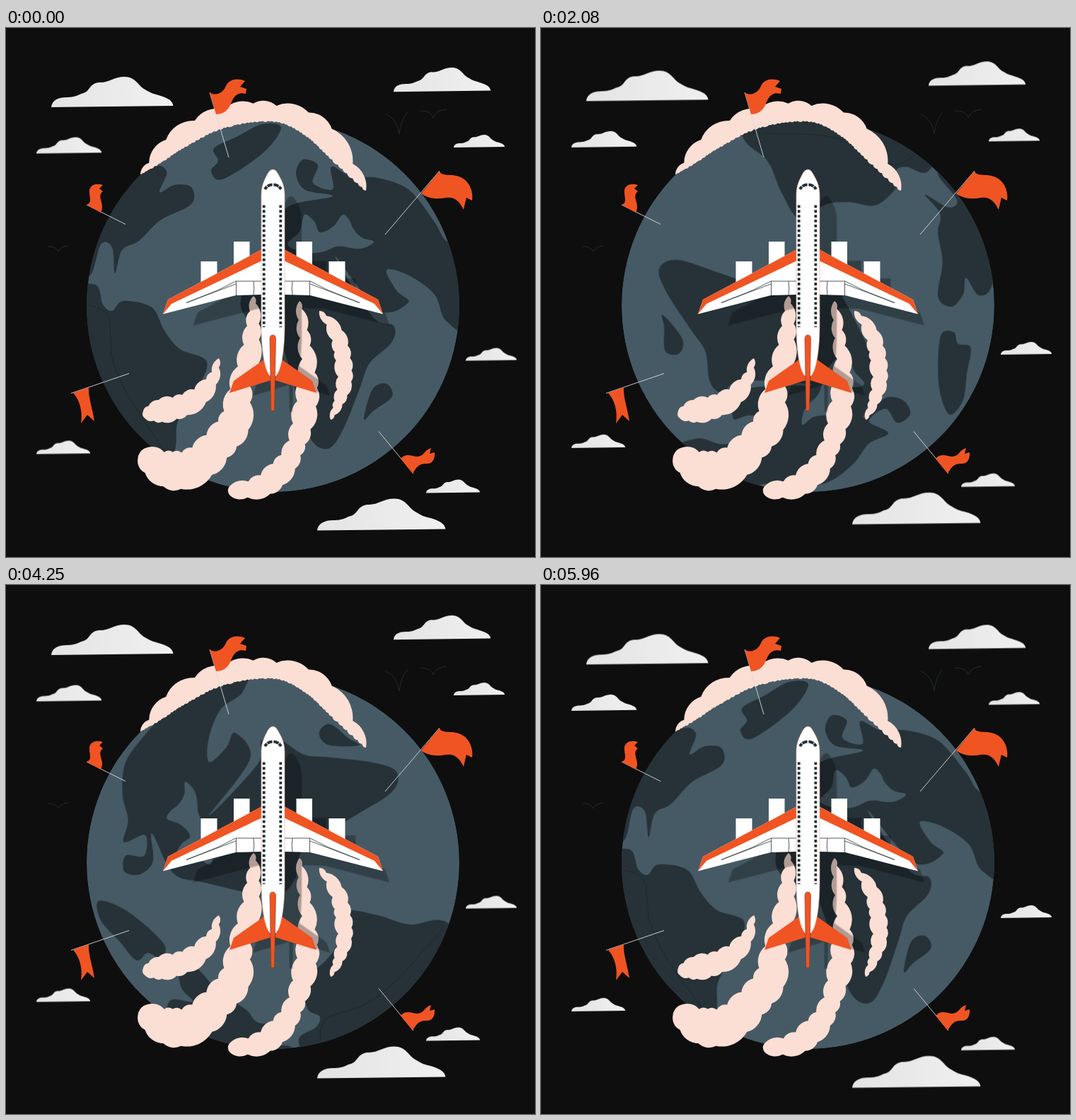
An HTML page for the animation above (6 s loop, 748 by 748 pixels).

```html
<!DOCTYPE html>
<html lang="en">
<head>
<meta charset="utf-8">
<title>Flight around the globe</title>
<style>
  html, body { margin: 0; width: 100%; height: 100%; overflow: hidden; background: #0e0e0e; }
  svg { display: block; width: 100vw; height: 100vh; }
  #world { transform-origin: 377.5px 392.5px; animation: spin 6s steps(144) -5ms infinite; }
  #clouds { animation: bob 3s steps(36) -46.7ms infinite; }
  @keyframes spin { to { transform: rotate(360deg); } }
  @keyframes bob {
    0%, 100% { transform: translateY(.4px); }
    50% { transform: translateY(-15.1px); }
  }
  .land { fill: #263238; }
  .sea { fill: #465a65; }
  .smoke { fill: #fbded4; }
  .orange { fill: #f05423; }
  .line { fill: none; stroke: #263238; }
  .pole { stroke: #dcdcdc; stroke-width: .9; }
</style>
</head>
<body>
<svg viewBox="0 0 748 748" preserveAspectRatio="none">
  <defs>
    <clipPath id="disc"><circle cx="377.5" cy="392.5" r="263.5"/></clipPath>
    <linearGradient id="haze"><stop stop-color="#e4e4e4"/><stop offset="1" stop-color="#f0f0f0"/></linearGradient>
    <path id="cloud" fill="url(#haze)" d="M0 43C1 33 10 29 22 29C36 29 38 25 46 23C55 20 54 10 67 8C82 9 88 0 104 0C120 0 123 13 133 18C143 24 142 23 152 26C166 30 172 34 173 41Z"/>
    <path id="engines" d="M322 302h22.500v36h-22.500zM275.500 330h23v34h-23z"/>
    <path id="wing" d="M362 313L229 384L222 404.500L325 378L362 377Z"/>
    <path id="fuselage" d="M361 236C361 222 366 214 370 206C372 202 375 200 377.500 200C380 200 382.500 202 384.500 206C389 214 394 222 394 236V420C394 460 388 494 377.500 494C367 494 361 460 361 420Z"/>
    <path id="stabilizer" d="M366 468L322 499L316 516L375 498Z"/>
    <path id="fin" d="M373 440Q373 434 377.200 434Q381.500 434 381.500 440L379.500 541H374.800Z"/>
    <g id="side">
      <use href="#engines" fill="#fff"/>
      <use href="#wing" fill="#fff"/>
      <path class="orange" d="M362 313L229 384L222 404.500L234 390L362 329Z"/>
      <path class="line" stroke-width=".8" d="M255 388.500L299 371L325 358H361M255 388.500L325 362M325.500 358V378M350 358Q351.500 368 350 378"/>
      <use href="#stabilizer" class="orange"/>
    </g>
    <g id="sideShape">
      <use href="#engines"/><use href="#wing"/><use href="#stabilizer"/>
    </g>
  </defs>

  <g class="line" stroke-width=".8">
    <path d="M537 122Q553 128 556 150Q558 130 568 119"/>
    <path d="M585 117Q602 117 604 127Q608 116 623 115"/>
    <path d="M59 309Q70 308 74 316Q77 309 88 308"/>
  </g>

  <g clip-path="url(#disc)">
    <circle class="sea" cx="377.500" cy="392.500" r="263.500"/>
    <g id="world"></g>
  </g>
  <g id="trails"></g>

  <g opacity=".3" transform="matrix(.893 0 0 .893 66.300 59.400)">
    <use href="#sideShape"/>
    <use href="#sideShape" transform="matrix(-1 0 0 1 755 0)"/>
    <use href="#fuselage"/><use href="#fin"/>
  </g>

  <g>
    <use href="#side"/>
    <use href="#side" transform="matrix(-1 0 0 1 755 0)"/>
    <use href="#fuselage" fill="#fff" stroke="#f3a68e" stroke-width=".6"/>
    <path class="line" stroke-width="3.800" stroke-dasharray="3.800 3.050" d="M364.700 250.500V423M388.300 250.500V423"/>
    <path class="line" stroke-width="4" stroke-dasharray="4.500 .9 7.500 .9" d="M366 228Q370 221.500 377.200 221.500M389 228Q385 221.500 377.800 221.500"/>
    <use href="#fin" class="orange" stroke="#7a3a2a" stroke-width=".6"/>
  </g>

  <path class="pole" d="M288 91L315 183M114 250L169 277.500M613 202L536 292M92 516.500L174 488.500M527 570.500L576 630"/>
  <g class="orange">
    <path d="M288 91C296 97 307 92 311 82C315 73 326 70 338 75L331 83L340 86L339 93C328 90 322 96 318 107C314 118 305 122 297 122Z"/>
    <path d="M114 250C123 247 117 238 118 229C120 221 128 219 137 222L132 227L137 231C127 239 141 248 134 261Z"/>
    <path d="M613 202C615 211 630 205 643 211C656 217 661 232 659 244L651 240L647 257C642 246 635 238 622 240C606 243 595 240 587 234Z"/>
    <path d="M95 516L117 508C116 522 122 536 125 556L115 547L106 559C109 540 103 525 95 516Z"/>
    <path d="M558 609C566 600 574 606 582 606C592 605 591 597 601 594L599 602L606 600C607 610 602 617 594 616C583 616 580 622 575 630Z"/>
  </g>

  <g id="clouds"></g>
</svg>
<script>
function add(parent, tag, attrs) {
  const el = document.createElementNS("http://www.w3.org/2000/svg", tag);
  for (const k in attrs) el.setAttribute(k, attrs[k]);
  document.getElementById(parent).append(el);
}

const keys = text => text.split(",").map(k => k.trim().split(/\s+/).map(Number));

// Catmull-Rom point at parameter u, in any number of dimensions.
function curve(p, u, closed) {
  const n = p.length, i = Math.floor(u), t = u - i;
  const at = j => closed ? p[(j + n) % n] : p[Math.max(0, Math.min(n - 1, j))];
  const [a, b, c, d] = [at(i - 1), at(i), at(i + 1), at(i + 2)];
  return b.map((v, k) => v + t / 2 * (c[k] - a[k]
    + t * (2 * a[k] - 5 * v + 4 * c[k] - d[k] + t * (3 * (v - c[k]) + d[k] - a[k]))));
}

// Closed coastline; curl pushes each edge's middle in and out by turns.
function coast(cls, text, curl = 0) {
  const p = keys(text).flatMap(([x, y], i, all) => {
    const [x2, y2] = all[(i + 1) % all.length], c = i % 2 ? curl : -curl;
    return curl ? [[x, y], [(x + x2) / 2 + c * (y2 - y), (y + y2) / 2 - c * (x2 - x)]] : [[x, y]];
  });
  const line = Array.from({ length: p.length * 8 }, (_, i) => curve(p, i / 8, true));
  add("world", "path", { class: cls, d: "M" + line.join("L") + "Z" });
}

function random(seed) {
  return () => (seed = seed * 16807 % 2147483647) / 2147483647;
}

// Smoke along a spine of "x y half-width" keys, with round puffs on both sides.
function trail(text, leftPuffs, rightPuffs) {
  const p = keys(text), last = p.length - 1, rnd = random(leftPuffs * 97);
  const edge = (u, sign) => {
    const [x, y, w] = curve(p, u);
    const [ax, ay] = curve(p, Math.max(0, u - .05)), [bx, by] = curve(p, Math.min(last, u + .05));
    const k = sign * w / Math.hypot(bx - ax, by - ay);
    return [x + (by - ay) * k, y - (bx - ax) * k];
  };
  const side = (n, sign) => Array.from({ length: n + 1 }, (_, i) => {
    const jitter = i % n ? (rnd() - .5) * .5 : 0;
    return edge((i + jitter) / n * last, sign);
  });
  const rim = [...side(leftPuffs, 1), ...side(rightPuffs, -1).reverse()];
  const arcs = rim.slice(1).map(([x, y], i) => {
    const r = Math.hypot(x - rim[i][0], y - rim[i][1]) * .85;
    return `A${r} ${r} 0 0 1 ${x} ${y}`;
  });
  add("trails", "path", { class: "smoke", d: "M" + rim[0] + arcs.join("") + "Z" });
}

// Eurasia and Africa, then the inland sea
coast("land", `670 300, 626 303, 605 273, 570 229, 526 212, 488 210, 460 196, 462 228, 434 219, 441 194, 420 186,
  410 206, 423 229, 462 238, 400 252, 376 290, 333 378, 346 416, 386 440, 411 520, 430 580, 455 595,
  476 569, 500 510, 514 474, 545 445, 548 421, 518 408, 465 322, 527 399, 569 388, 552 371, 538 342, 570 350,
  606 377, 622 414, 660 425`);
coast("sea", "398 306, 422 264, 444 289, 476 264, 491 284, 520 302, 494 312, 446 317", .12);
// Madagascar, Greenland, North and South America
coast("land", "538 503, 546 521, 520 541, 506 553, 518 511");
coast("land", "389 141, 363 177, 306 214, 290 202, 300 188, 294 170, 326 154, 362 136");
coast("land", `90 350, 119 350, 134 306, 150 310, 154 347, 164 314, 188 301, 218 272, 262 249, 262 225,
  238 222, 217 232, 227 202, 195 200, 90 270`);
coast("land", `60 390, 123 362, 137 391, 150 400, 166 386, 206 395, 224 428, 246 454, 284 472, 268 515,
  243 556, 228 612, 120 640`);
add("world", "path", {
  class: "line", style: "stroke:#1b2428", "stroke-width": .8,
  d: "M117 392Q146 398 147 415L149 462Q160 505 188 545L225 600"
});

trail("190 207 0, 217 183 7, 246 157 13, 294 133 12, 345 120 13, 392 123 11, 436 141 16, 468 176 12, 509 230 0", 10, 60);
trail("350 379 0, 350 410 7, 345 460 11, 331 510 13, 325 555 21, 301 588 21, 262 623 25, 222 622 24, 192 602 10", 14, 13);
trail("301 467 0, 292 497 7, 270 524 13, 240 537 15, 215 542 15, 195 547 5", 8, 8);
trail("415 386 0, 419 420 5, 426 470 7, 427 515 13, 419 560 13, 408 595 11, 390 625 15, 360 649 14, 316 655 6", 14, 12);
trail("443 400 0, 467 430 8, 476 465 10, 479 500 9, 470 530 6, 459 554 0", 10, 9);

const clouds = keys(`64 69 172, 43 154.5 92, 548 56 137, 633 151 72,
  650 452.5 72, 43 583.5 76, 594 638.5 76, 440 665.5 181`);
for (const [x, y, w] of clouds)
  add("clouds", "use", { href: "#cloud", transform: `translate(${x} ${y}) scale(${w / 172.5})` });
</script>
</body>
</html>
```
